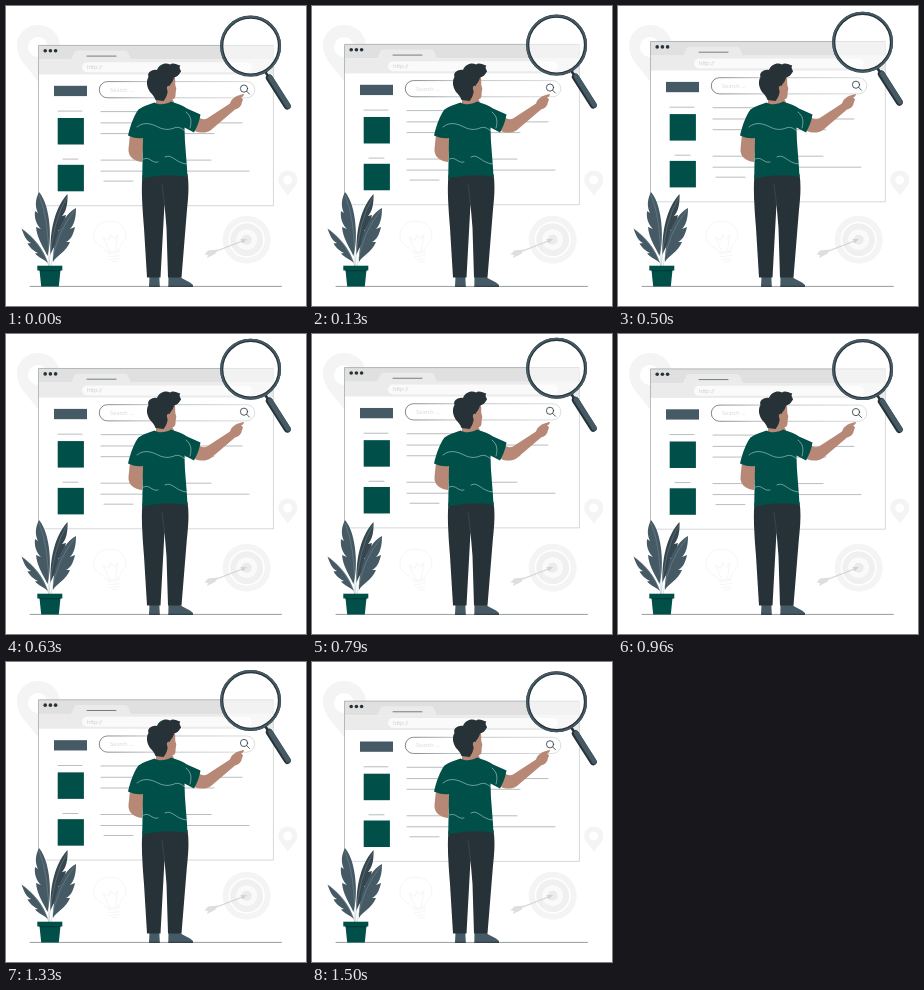
Animation of 300x300 px, one loop 1.54 s. Source, as an HTML page:

```html
<!DOCTYPE html>
<html lang="en">
<head>
<meta charset="utf-8">
<title>Search illustration</title>
<style>
  html, body { margin: 0; width: 100%; height: 100%; overflow: hidden; background: #fff; }
  svg { display: block; width: 100vw; height: 100vh; }
  text { font-family: Lato, "Open Sans", sans-serif; }
  .ink { fill: #263238; }
  .slate { fill: #455a64; }
  .teal { fill: #004f48; }
  .skin { fill: #b78876; }
  .pale { fill: #f4f4f4; }
  .line { fill: none; stroke: #263238; stroke-width: .6; stroke-linecap: round; stroke-linejoin: round; }
  .rows { stroke-width: .5; opacity: .65; }
  .faint { fill: none; stroke: #efefef; stroke-width: .6; stroke-linecap: round; stroke-linejoin: round; }
  .seam { fill: none; stroke: #c9dedb; stroke-width: .55; stroke-linecap: round; }
  .vein { fill: none; stroke: #90a4ae; stroke-width: .35; }
</style>
</head>
<body>
<svg viewBox="0 0 300 300" preserveAspectRatio="none">
  <defs>
    <linearGradient id="fade">
      <stop offset="0" stop-color="#263238"/>
      <stop offset=".3" stop-color="#8a9296"/>
      <stop offset="1" stop-color="#c4c8ca"/>
    </linearGradient>
  </defs>

  <!-- backdrop -->
  <g class="pale">
    <path fill-rule="evenodd" d="M32 19C19 19 11 29 11 40C11 54 25 64 33 77C41 64 54 54 54 40C54 29 45 19 32 19ZM32 31A10 10 0 1 1 32 51A10 10 0 1 1 32 31Z"/>
    <path fill-rule="evenodd" d="M281.700 164.500C276 164.500 272.300 169 272.300 174C272.300 180 278.500 184 281.700 189.500C285.500 184 291.300 180 291.300 174C291.300 169 288 164.500 281.700 164.500ZM281.700 169.500A4.500 4.500 0 1 1 281.700 178.500A4.500 4.500 0 1 1 281.700 169.500Z"/>
  </g>
  <g>
    <circle cx="240.700" cy="233.700" r="24" fill="#f4f4f4"/>
    <circle cx="240.700" cy="233.700" r="18" fill="#fff"/>
    <circle cx="240.700" cy="233.700" r="16.500" fill="#f0f0f0"/>
    <circle cx="240.700" cy="233.700" r="10.500" fill="#fafafa"/>
    <circle cx="240.700" cy="233.700" r="5" fill="#ebebeb"/>
    <path d="M208 246L239 234" stroke="#d2d2d2" stroke-width="1.200"/>
    <path d="M198.500 248.500L202 244.500L212 243.500L209 248L201 252L202 249Z" fill="#dedede"/>
    <path d="M234.500 233L241 233L236.500 237.500Z" fill="#d2d2d2"/>
  </g>
  <g class="faint" transform="rotate(-10 104 230)">
    <path d="M98 245C96 238 88 238 88 229C88 221 95 215 103 215C112 215 120 221 120 230C120 238 112 239 110 246Z"/>
    <path d="M99 247L110 248M99 250L110 251M100 253L109 254M102 256H108M101 245L97 230L102 234L105 229L108 234L112 230L107 245"/>
  </g>

  <!-- browser window -->
  <g class="float">
    <rect x="32.500" y="39.800" width="234.900" height="160.300" fill="#fff"/>
    <rect x="32.500" y="39.800" width="234.900" height="14.200" fill="#e0e0e0"/>
    <rect x="32.500" y="54" width="234.900" height="14.800" fill="#ebebeb"/>
    <path d="M65 54L68.500 46.500Q69.300 45 71 45H119Q121 45 121.800 46.500L125 54Z" fill="#ebebeb"/>
    <rect x="76" y="56.700" width="170" height="10" rx="5" fill="#fafafa"/>
    <text x="81" y="63.600" font-size="5.700" fill="#d0d0d0">http://</text>
    <path class="line" d="M81 50.500H110"/>
    <g class="ink">
      <circle cx="39.200" cy="45.200" r="1.800"/>
      <circle cx="44.400" cy="45.200" r="1.800"/>
      <circle cx="49.600" cy="45.200" r="1.800"/>
    </g>
    <path d="M32.500 200.100V39.800H267.400" fill="none" stroke="#8a9296" stroke-width=".6"/>
    <path d="M32.500 200.100H267.400V39.800" fill="none" stroke="#b9bfc2" stroke-width=".6"/>
    <rect class="slate" x="48" y="80.200" width="33" height="10.300"/>
    <rect x="93.300" y="76" width="155.500" height="16.200" rx="8.100" fill="none" stroke="url(#fade)" stroke-width=".6"/>
    <text x="104" y="86.200" font-size="6" fill="#dadada">Search ...</text>
    <g class="line" style="stroke-width:.8">
      <circle cx="238" cy="83" r="3.600"/>
      <path d="M240.700 85.700L243.500 88.500"/>
    </g>
    <rect class="teal" x="51.700" y="112.400" width="26.200" height="26.500"/>
    <rect class="teal" x="51.700" y="159.200" width="26.200" height="26.500"/>
    <g id="rows" class="line rows"></g>
  </g>

  <!-- magnifying glass -->
  <g class="float">
    <circle cx="244.600" cy="40.500" r="28" fill="#fff" opacity=".6"/>
    <path d="M258.500 65L264 73.500" stroke="#263238" stroke-width="2.600"/>
    <path d="M263.300 72.300L281.300 100.500" stroke="#263238" stroke-width="7" stroke-linecap="round"/>
    <path d="M264.300 71.900L282.200 100.200" stroke="#455a64" stroke-width="5" stroke-linecap="round"/>
    <circle cx="244.600" cy="40.500" r="28.900" fill="none" stroke="#263238" stroke-width="3.200"/>
    <circle cx="244.600" cy="40.500" r="29.400" fill="none" stroke="#455a64" stroke-width="2"/>
  </g>

  <path class="line" d="M24 280.400H275.500" opacity=".8"/>

  <!-- plant -->
  <g>
    <path class="slate" d="M42 257C38 244 28 231 15.500 222.500C18 229 20 235 25 237L21.500 237.500C25 243 28 245 32 247L29 247.500C33 252 38 253 42 257Z"/>
    <path class="slate" d="M41.500 250C46 235 45 200 33 186C29 194 29 201 32 207L29 205C28 213 31 219 35 223L30 221C31 233 38 242 41.500 250Z"/>
    <path fill="#37474f" d="M44.500 249C44 232 46 205 61.500 188C62 198 60 206 56 210L60 209C58 218 55 222 52 225L55 225C53 235 47 241 44.500 249Z"/>
    <path class="slate" d="M47 256C47 236 54 211 70 202C70 212 68 219 64 223L69 221C67 230 64 234 60 236L64 236C60 246 50 250 47 256Z"/>
    <path class="vein" d="M43 260Q36 239 18 224M43 260Q43 212 33 189M43 260Q47 213 61 191M45 260Q51 225 69 204"/>
    <path class="teal" d="M33.500 264H54.500L52.800 280.600H35.200Z"/>
    <rect class="teal" x="31.300" y="259.700" width="25" height="4.800"/>
    <path d="M33.700 264.700H54.300" stroke="#00332e" stroke-width=".8"/>
  </g>

  <!-- man -->
  <g>
    <path class="slate" d="M143.500 270H153.300L153.800 280.700H143Z"/>
    <path class="slate" d="M162.500 270H173.500C176.500 274 184 275 187 279V280.700H162.300Z"/>
    <path d="M143 280.300H153.800M162.300 280.300H187" stroke="#263238" stroke-width=".9"/>
    <path class="ink" d="M136.500 169L181.500 168C183.500 181 182 194 180.800 206L175.500 271.500H162L160.500 222L158.500 198L154.500 271.500H141L138 222C136.500 202 135 184 136.500 169Z"/>
    <path d="M158.500 198L156 178" stroke="#455a64" stroke-width=".5"/>

    <path class="skin" d="M124 128L122.500 143C122 150 127 155 136 156L138 130Z"/>
    <path class="skin" d="M190 110C194 113 198 114 201 112.500L224 97.500C225.500 92.500 230 89.500 237.300 88C238.600 88.400 238 90 235 91.500C237 92 237.500 94 236 96C235.500 100 233 102.500 229 103.500L205 124C200 127.500 194 127 189 125Z"/>

    <path class="skin" d="M150 84L150 98C155 101 163 100 168 96.500L166.500 93C169 93 169.600 91 169.600 87L170.300 82.500L169.300 79L169 69L160 70Z"/>
    <path class="ink" d="M144 86C140.500 81 140 75 142.500 71C140.500 66 147 63 151 64C153 58 160 56 164 58.500C167 56 171 59 174.300 59.500C172.500 62 174.800 63.500 175 65.500C173 69 171 71 168 71.500C167 76 165 77 163.500 80C161.500 79 160.500 81 161 83.500C162.500 85 161 91 157.500 95L149.500 94C148 90 146 88 144 86Z"/>

    <path class="teal" d="M148.500 96.500C153 99.500 160 98.500 165 95.500C172 98 177 99.500 181 102.500L194.500 108.500C193.500 115 191 121 188 126.500L178.500 121.500C178.500 138 181 155 181.500 171C167 167.800 150 169 136.200 172.500L137 132C132 133 126 131.500 122 129.500C124.500 119 128 109 132.500 103.500C137 100 143 98.500 148.500 96.500Z"/>
    <path class="seam" d="M131 121C138 115 146 118 152 121S163 124 168 122S176 123 179 125M137.500 153C144 150 146 158 152 156M159 151C166 147 169 157 180.500 158M180 106C185 110 186 115 184 122"/>
  </g>
</svg>
<script>
  const LOOP = 1540, TOP = -0.4, RISE = 6;

  // text rows: x1, x2, y
  const rows = [
    [52, 76, 105.5], [57, 72, 153.5],
    [95, 160, 106], [95, 236, 117.3], [95, 208, 128],
    [95, 205, 154.5], [95, 243, 165.5], [98, 127, 175.5]
  ];
  const svgNS = "http://www.w3.org/2000/svg";
  const holder = document.getElementById("rows");
  for (const [x1, x2, y] of rows) {
    const p = document.createElementNS(svgNS, "path");
    p.setAttribute("d", `M${x1} ${y}H${x2}`);
    holder.append(p);
  }

  // linear bob: up for half the loop, then back down
  const floats = document.querySelectorAll(".float");
  function draw(now) {
    const phase = (now % LOOP) / LOOP;
    const y = TOP - RISE * (1 - Math.abs(1 - 2 * phase));
    floats.forEach(g => g.setAttribute("transform", `translate(0 ${y.toFixed(3)})`));
  }
  const start = performance.now();
  function tick() {
    draw(performance.now() - start);
    requestAnimationFrame(tick);
  }
  tick();
</script>
</body>
</html>
```
